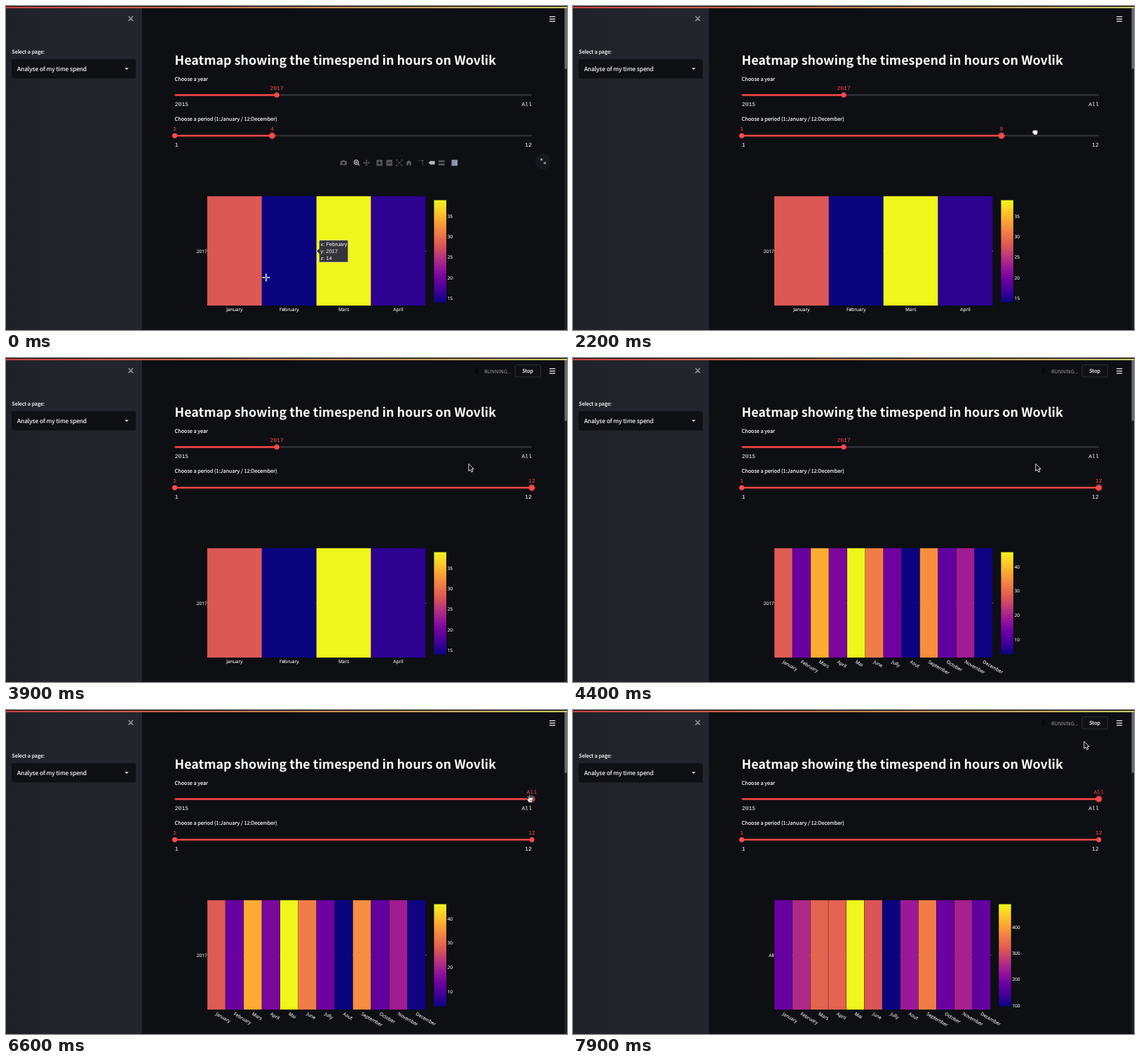
An HTML page that plays this animation: 800x463 px, repeating every 8 s.

```html
<!DOCTYPE html>
<html lang="en">
<head>
<meta charset="utf-8">
<title>Time spend heatmap</title>
<style>
html, body { margin: 0; width: 100%; height: 100%; overflow: hidden; background: #0e0f13; }
svg { display: block; width: 800px; height: 463px; text-rendering: geometricPrecision; }
text { fill: #fafafa; white-space: pre; }
.ui { font-family: "Noto Sans CJK JP", "Noto Sans CJK SC", "Noto Sans CJK", "Noto Sans", sans-serif; font-size: 7.27px; }
.label { stroke: #fafafa; stroke-width: .18px; }
.mono { font-family: "Liberation Mono", "Noto Sans Mono", monospace; font-size: 8.08px; }
.tick { font-family: "Open Sans", "Noto Sans", sans-serif; font-size: 6.6px; stroke: #fafafa; stroke-width: .1px; }
.tip { font-family: "Liberation Sans", Arial, sans-serif; font-size: 7.5px; }
.red { fill: #ff4b4b; }
.mid { text-anchor: middle; }
.end { text-anchor: end; }
</style>
</head>
<body>
<svg viewBox="0 0 800 463" xmlns="http://www.w3.org/2000/svg">
  <defs>
    <linearGradient id="top"><stop stop-color="#f84747"/><stop offset="1" stop-color="#f8f27a"/></linearGradient>
    <linearGradient id="side"><stop stop-color="#202127"/><stop offset=".3" stop-color="#23232b"/><stop offset="1" stop-color="#24242c"/></linearGradient>
    <linearGradient id="scale" x1="0" y1="1" x2="0" y2="0"></linearGradient>
  </defs>
  <rect width="800" height="463" fill="#0e0f13"/>
  <rect width="194" height="463" fill="url(#side)"/>
  <rect x="796" width="4" height="463" fill="#1c1d21"/>
  <rect x="796.6" y="3" width="3.4" height="87" rx="1.5" fill="#69696c"/>
  <rect width="800" height="1.4" fill="#17171b"/>
  <rect y="1.4" width="800" height="1.7" fill="url(#top)"/>

  <path d="M175 15l5.8 5.8M180.8 15l-5.8 5.8" stroke="#8b8c92" stroke-width="1.7" stroke-linecap="round"/>
  <text class="ui label" x="8.3" y="67.5">Select a page:</text>
  <rect x="8" y="76" width="177" height="27.5" rx="2.3" fill="#0f1014"/>
  <text class="ui label" x="16" y="93.2" style="font-size:8.33px">Analyse of my time spend</text>
  <path d="M169.4 88.4h5.2l-2.6 2.8z" fill="#fafafa"/>

  <path d="M775 15.4h8.3M775 18.6h8.3M775 21.8h8.3" stroke="#f0f0f2" stroke-width="1.3"/>
  <g id="run">
    <g stroke="#050609" fill="none" stroke-width="1.4"><circle cx="671.5" cy="14.6" r=".8"/><path d="M671 16.5l-1 3 2 2v2M670 19.5l-1.5 3.5M668 17l3-.5 2.5 1.5"/></g>
    <text class="ui" x="682" y="21.6" style="fill:#9a9ba1">RUNNING...</text>
    <rect x="726" y="9.8" width="36.5" height="17.3" rx="2.3" fill="#0f1014" stroke="#3b3c43" stroke-width=".8"/>
    <text class="ui label mid" x="744" y="21.1">Stop</text>
  </g>

  <text class="ui" x="240.6" y="84" style="font-size:17.95px;font-weight:600">Heatmap showing the timespend in hours on Wovlik</text>
  <text class="ui label" x="240.6" y="107">Choose a year</text>
  <text class="mono" x="240.7" y="142.8">2015</text>
  <text class="mono end" x="749.8" y="142.8">All</text>
  <text class="ui label" x="240.6" y="164.4">Choose a period (1:January / 12:December)</text>
  <text class="mono" x="240.7" y="200.9">1</text>
  <text class="mono end" x="749.8" y="200.9">12</text>
  <g id="sliders"></g>
  <g id="charts"></g>

  <g id="tip">
    <path d="M442.8 350.3l3.8-3.6V334.7h41.2v31.4h-41.2v-12.2z" fill="#35343a" stroke="#dededf" stroke-width=".6"/>
    <text class="tip" x="448.6" y="342.9">x: February</text>
    <text class="tip" x="448.6" y="352.7">y: 2017</text>
    <text class="tip" x="448.6" y="362.5">z: 14</text>
  </g>

  <g id="bar" fill="#56575b" stroke="none">
    <path d="M476.6 221.6h2.4l.8-1.4h3l.8 1.4h2.4v6h-9.4z"/><circle cx="481.3" cy="224.4" r="1.8" fill="#0e0f13"/>
    <g fill="none" stroke="#b9babd" stroke-width="1.3"><circle cx="499.4" cy="223.2" r="3"/><path d="M501.6 225.5l2.5 2.6M498 223.2h2.8M499.4 221.8v2.8"/></g>
    <path d="M514 219.2l1.8 2.2h-1.2v2h2.2v-1.2l2.1 1.8-2.1 1.8v-1.2h-2.2v2h1.2L514 228.8l-1.8-2.2h1.2v-2h-2.2v1.2l-2.1-1.8 2.1-1.8v1.2h2.2v-2h-1.2z"/>
    <path d="M528.3 219.8h8.6v8.6h-8.6z"/><path d="M529.8 224.1h5.6M532.6 221.3v5.6" stroke="#0e0f13" stroke-width="1.2"/>
    <path d="M542.3 219.8h8.6v8.6h-8.6z"/><path d="M543.8 224.1h5.6" stroke="#0e0f13" stroke-width="1.2"/>
    <path d="M556.5 221.6v-1.8h2M563.2 219.8h2v1.8M565.2 226.6v1.8h-2M558.5 228.4h-2v-1.8M557.8 221l6.2 6.2M564 221l-6.2 6.2" fill="none" stroke="#56575b" stroke-width=".9"/>
    <path d="M570.2 224.2l4.3-4 4.3 4h-1v3.7h-2.3v-2.4h-2v2.4h-2.3v-3.7z"/>
    <path d="M588 221h6.2v7" fill="none" stroke="#56575b" stroke-width="1.1" stroke-dasharray="2 1"/><circle cx="594.2" cy="221" r="1.2"/>
    <path d="M602.5 224.1l2.6-2.5h6.4v5h-6.4z" fill="#b9babd"/>
    <path d="M616.6 220.5h9v2.8h-9zM616.6 224.9h9v2.8h-9z"/>
    <rect x="635.4" y="219.8" width="8.6" height="8.6" fill="#8f93ad"/>
    <circle cx="766" cy="222" r="11.3" fill="#17181d"/>
    <path d="M762.8 221.2V218.6h2.6M762.8 218.6l2.4 2.4M769.2 222.6v2.6h-2.6M769.2 225.2l-2.4-2.4" fill="none" stroke="#d0d0d3" stroke-width=".9"/>
  </g>

  <g id="cross"><path d="M-5.3 0H5.3M0-5.3V5.3" stroke="#fff" stroke-width="2.2"/><path d="M-4.6 0H4.6M0-4.6V4.6" stroke="#222" stroke-width=".7"/></g>
  <g id="arrow"><path d="M0 0V10.2L2.4 8l1.7 3.7 1.8-.8L4.3 7.3H7.4z" fill="#000" stroke="#fff" stroke-width=".9" stroke-linejoin="round"/></g>
  <g id="fist"><path d="M-3.4-2.2q.8-1.4 1.8-.5 1-1 1.9-.2 1-.7 1.7.2 1.4-.5 1.6.9v2.2q-.2 1.6-1.2 3h-4q-1-1.7-2.2-2.8-.8-1.4.4-1.6z" fill="#fff" stroke="#111" stroke-width=".5"/></g>
  <g id="palm"><path d="M-2.6 4.9Q-3.4 2.6-5.4.6q-.5-1.5 1-1.2l1.2.9-1.2-4q.4-1.5 1.5-.4l1 2.6-.5-3.3q.7-1.4 1.7 0l.5 3 .4-2.8q1-1.2 1.6.1l-.1 3 .9-2q1.3-.8 1.5.4-.2 3.2-1.3 5.4l-.3 2.6z" fill="#fff" stroke="#000" stroke-width=".8"/><path d="M-.9 1.2v2.2M.6 1.2v2.2M2 1.2v2.2" stroke="#000" stroke-width=".5"/></g>
</svg>
<script>
const NS = "http://www.w3.org/2000/svg";
const LOOP = 8000, STEP = 100;
const LEFT = 240.6, WIDTH = 509.2;
const $ = id => document.getElementById(id);

function add(parent, tag, attrs, text) {
  const el = document.createElementNS(NS, tag);
  for (const k in attrs) el.setAttribute(k, attrs[k]);
  if (text !== undefined) el.textContent = text;
  parent.appendChild(el);
  return el;
}
const show = (el, on) => el.setAttribute("visibility", on ? "visible" : "hidden");

// Plasma colour scale
const stops = ["0a047f", "40009a", "6b00a0", "97149a", "b9347f", "db5754", "ee7849", "fb9f36", "fcca26", "eff61c"]
  .map(h => [0, 2, 4].map(i => parseInt(h.slice(i, i + 2), 16)));
function plasma(f) {
  const p = f * (stops.length - 1), i = Math.min(stops.length - 2, Math.floor(p));
  return `rgb(${stops[i].map((c, k) => Math.round(c + (stops[i + 1][k] - c) * (p - i)))})`;
}
stops.forEach((c, i) => add($("scale"), "stop", { offset: i / (stops.length - 1), "stop-color": `rgb(${c})` }));

const months = ["January", "February", "Mars", "April", "Mai", "June", "Jully", "Aout", "September", "October", "November", "December"];

function chart({ row, right, cells, ticks, tickY, gap }) {
  const g = add($("charts"), "g", {});
  const x0 = 287, w = (right - x0) / cells.length;
  const narrow = cells.length > 4, seam = narrow ? .4 : 0;
  cells.forEach((f, i) => {
    const x = x0 + i * w, cx = x + w / 2;
    add(g, "rect", { x: x + seam / 2, y: 271.8, width: w - seam, height: 156.3, fill: plasma(f) });
    add(g, "path", { d: `M${x + w - .4} 350.2h1.2`, stroke: "#8d8d92", "stroke-width": .9 });
    if (narrow)
      add(g, "text", { class: "tick", transform: `translate(${cx - 1.6} 435.6) rotate(30)` }, months[i]);
    else
      add(g, "text", { class: "tick mid", x: cx, y: 436.4 }, months[i]);
  });
  add(g, "text", { class: "tick end", x: 286.8, y: 352.7 }, row);
  add(g, "rect", { x: right + 12, y: 277.5, width: 17.5, height: 146, fill: "url(#scale)" });
  ticks.forEach((v, i) =>
    add(g, "text", { class: "tick", x: right + 31, y: tickY + i * gap + 2.5 }, v));
  return g;
}

const charts = [
  chart({ row: "2017", right: 598.4, cells: [.56, 0, 1, .07], ticks: [35, 30, 25, 20, 15], tickY: 300.7, gap: 29.1 }),
  chart({ row: "2017", right: 598.4, cells: [.57, .22, .81, .26, 1, .68, .23, 0, .73, .2, .36, .01], ticks: [40, 30, 20, 10], tickY: 298.3, gap: 34.6 }),
  chart({ row: "All", right: 595.2, cells: [.21, .41, .6, .6, 1, .55, 0, .35, .68, .22, .38, .2], ticks: [400, 300, 200, 100], tickY: 310, gap: 37.4 })
];

function slider(y, range) {
  const g = $("sliders");
  add(g, "rect", { x: LEFT, y: y - 1.2, width: WIDTH, height: 2.4, rx: 1.2, fill: "#2f3035" });
  const fill = add(g, "rect", { x: LEFT, y: y - 1.2, height: 2.4, rx: 1.2, fill: "#f94747" });
  const halo = add(g, "circle", { cy: y, r: 5.1, fill: "#ff4b4b", opacity: .5 });
  const knob = add(g, "circle", { cy: y, r: 3.6, fill: "#ff4b4b" });
  const label = add(g, "text", { class: "mono mid red", y: y - 7.1 });
  if (range) {
    add(g, "circle", { cx: LEFT, cy: y, r: 3.6, fill: "#ff4b4b" });
    add(g, "text", { class: "mono mid red", x: LEFT, y: y - 7.1 }, 1);
  }
  return (f, text, focus) => {
    const x = LEFT + f * WIDTH;
    fill.setAttribute("width", x - LEFT);
    halo.setAttribute("cx", x);
    knob.setAttribute("cx", x);
    label.setAttribute("x", x);
    label.textContent = text;
    show(halo, focus);
  };
}
const setYear = slider(127.2, false), setPeriod = slider(185.3, true);

// Pointer stops: time, x, y
const path = [
  [0, 371, 388], [100, 371, 388], [800, 381.3, 188.5], [1400, 381.3, 188.5],
  [2200, 659, 180.5], [2300, 661, 180.5], [3100, 757, 183], [3250, 757, 183],
  [3700, 659.8, 151.3], [4800, 659.8, 151.3], [5500, 386.4, 127], [5650, 386.4, 127],
  [6400, 748, 127.3], [6650, 748, 127.3], [7300, 728.8, 45], [LOOP, 728.8, 45]
];
function pointer(t) {
  const i = Math.max(1, path.findIndex(p => p[0] >= t));
  const a = path[i - 1], b = path[i], u = (t - a[0]) / (b[0] - a[0]), e = u * u * (3 - 2 * u);
  return { x: a[1] + (b[1] - a[1]) * e, y: a[2] + (b[2] - a[2]) * e };
}

// Slider step under the pointer, trailing it slightly
function dragged(t, from, to, first, last) {
  if (t < from) return first;
  if (t >= to) return last;
  const f = (pointer(t - 150).x - LEFT) / WIDTH;
  return Math.max(first, Math.min(last, Math.round(f * last)));
}

function draw(t) {
  const p = pointer(t);
  const month = dragged(t, 1500, 3250, 3, 11);
  const year = dragged(t, 5750, 6600, 2, 7);
  const yearFocus = t >= 5600;
  setPeriod(month / 11, month + 1, !yearFocus);
  setYear(year / 7, year === 7 ? "All" : 2015 + year, yearFocus);

  const stage = t < 4200 ? 0 : t < 7700 ? 1 : 2;
  charts.forEach((c, i) => show(c, i === stage));

  const inPlot = t < 1000 && p.y > 272;
  show($("tip"), inPlot);
  show($("bar"), t < 1000 && p.y > 212);
  show($("run"), (t >= 3500 && t < 4600) || t >= 6900);

  const shape = inPlot ? "cross"
    : (t >= 1500 && t < 3350) || (t >= 5650 && t < 6400) ? "fist"
    : t >= 6400 && t < 6750 ? "palm" : "arrow";
  for (const id of ["cross", "arrow", "fist", "palm"]) {
    show($(id), id === shape);
    $(id).setAttribute("transform", `translate(${p.x} ${p.y})`);
  }
}

function frame() {
  const t = performance.now() % LOOP;
  draw(Math.floor(t / STEP) * STEP);
  requestAnimationFrame(frame);
}
frame();
</script>
</body>
</html>
```
